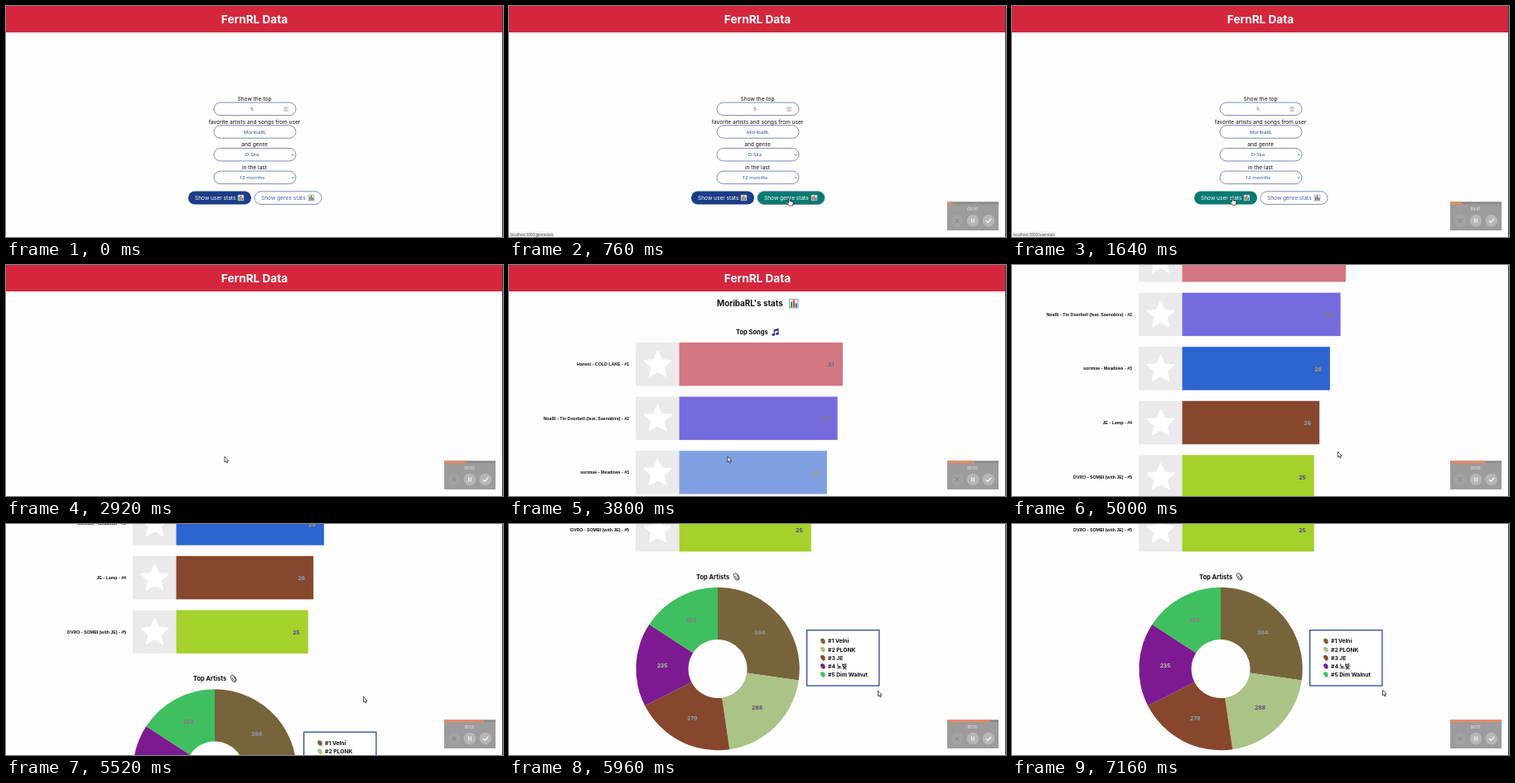
An HTML page for the animation above (7.2 s loop, 600x280 px).

```html
<!DOCTYPE html>
<html lang="en">
<head>
<meta charset="utf-8">
<title>Listening stats</title>
<style>
  html, body { margin: 0; width: 100%; height: 100%; overflow: hidden; background: #fefdfe; }
  svg { display: block; width: 600px; height: 280px; }
  text { font-family: Inter, "Noto Sans CJK KR", "Noto Sans CJK", sans-serif; }
  .bold { font-weight: 700; }
  .field { font-family: "Open Sans", "Noto Sans", sans-serif; }
  .label { font-family: "Liberation Sans", Arial, sans-serif; font-weight: 700; }
</style>
</head>
<body>
<svg id="stage" viewBox="0 0 600 280" xmlns="http://www.w3.org/2000/svg"></svg>
<script>
const LOOP = 7200;
const FRAME = 40;
const BLUE = '#203f8e';
const USER = 'MoribaRL';

const songs = [
  { name: 'Hanesi - COLD LAKE', plays: 31, fill: '#d37782', ink: '#42777e' },
  { name: 'NoaRi - Tin Doorbell (feat. Saenobira)', plays: 30, fill: '#766bdd', ink: '#85815c' },
  { name: 'sorimae - Meadows', plays: 28, fill: '#2c65d0', ink: '#c3a052' },
  { name: 'JE - Lamp', plays: 26, fill: '#86472c', ink: '#7eb0bf' },
  { name: 'DVRO - SOMBI (with JE)', plays: 25, fill: '#a4d12c', ink: '#4a36a0' }
];
const artists = [
  { name: 'Velni', plays: 384, fill: '#78643a', ink: '#9d96bb' },
  { name: 'PLONK', plays: 288, fill: '#abc386', ink: '#58467f' },
  { name: 'JE', plays: 279, fill: '#86472c', ink: '#7fabc0' },
  { name: '노빛', plays: 235, fill: '#7d1a91', ink: '#a6dca0' },
  { name: 'Dim Walnut', plays: 223, fill: '#3fbf60', ink: '#a9608b' }
];
const bar = { x: 205.5, top: 94, pitch: 65.6, height: 52.5, unit: 6.37 };
const donut = { x: 252, y: 551, outer: 98.7, inner: 35.5 };

// y is the visual middle of the line
const text = (x, y, size, str, { fill = '#111', cls = '', anchor = 'middle', id = '' } = {}) =>
  `<text x="${x}" y="${y + size * 0.36}" font-size="${size}" fill="${fill}" class="${cls}"
    text-anchor="${anchor}" ${id && `id="${id}"`}>${str}</text>`;

const rect = (x, y, w, h, fill, extra = '') =>
  `<rect x="${x}" y="${y}" width="${w}" height="${h}" fill="${fill}" ${extra}/>`;

const polar = (r, a) => [r * Math.sin(a), -r * Math.cos(a)];

const chartIcon = (x, y, s) => `<g transform="translate(${x} ${y}) scale(${s / 10})">
  ${rect(0, 0, 10, 10, '#e9eef0', 'stroke="#7d93a0" stroke-width=".8"')}
  ${rect(1.4, 3, 2, 6.4, '#3a9b4b')}${rect(4.1, 1, 2, 8.4, '#d8483c')}${rect(6.8, 4.6, 2, 4.8, '#2c6fb8')}</g>`;

const noteIcon = (x, y) => `<g transform="translate(${x} ${y})" fill="#4b3598">
  <path d="M2.6 1.4 8.6 0v6.4H7.3V2.9L3.9 3.7v4.2H2.6z"/>
  <ellipse cx="2.2" cy="7.8" rx="2" ry="1.5"/><ellipse cx="6.9" cy="6.5" rx="2" ry="1.5"/></g>`;

const clipIcon = (x, y) => `<path transform="translate(${x} ${y}) rotate(-28)" fill="none" stroke="#555"
  stroke-width=".9" d="M-1.2-2V2a1.2 1.2 0 0 0 2.4 0V-2.6a2 2 0 0 0-4 0V2.4a2.6 2.6 0 0 0 5 0V-2"/>`;

const header = rect(0, 0, 600, 32, '#d4273d') +
  text(300, 16, 13.6, 'FernRL Data', { fill: '#fff', cls: 'bold' });

function formPage() {
  const rows = [
    ['Show the top', '5', 297], ['favorite artists and songs from user', USER, 300.5],
    ['and genre', 'D-Ska', 297], ['in the last', '12 months', 297]
  ];
  const fields = rows.map(([label, value, x], i) => {
    const y = 117 + i * 27.7;
    const arrow = i > 1 ? `<path d="M344.8 ${y + 7.2}l1.5 1.5 1.5-1.5" fill="none" stroke="${BLUE}" stroke-width=".8"/>` : '';
    return text(300, y - 4.3, 6.6, label) +
      rect(251, y, 99, 15.5, '#fff', 'rx="7.75" stroke="#5d70a4" stroke-width=".8"') +
      text(x, y + 7.9, 6.1, value, { fill: BLUE, cls: 'field' }) + arrow;
  }).join('');
  const spinner = rect(334.5, 121.5, 7, 7, '#e6e6ea', 'rx="1.5"') +
    '<path d="M336.5 124.2l1.5-1.4 1.5 1.4M336.5 126l1.5 1.4 1.5-1.4" fill="none" stroke="#777" stroke-width=".6"/>';
  return fields + spinner +
    rect(220, 224.4, 76, 16.2, '#1b3d87', 'rx="8.1" id="userButton"') +
    text(228, 232.5, 6.55, 'Show user stats', { fill: '#fff', anchor: 'start' }) + chartIcon(280, 229, 7) +
    rect(300, 224.8, 81, 15.6, '#fff', 'rx="7.8" stroke="#5d70a4" stroke-width=".8" id="genreButton"') +
    text(308, 232.5, 6.55, 'Show genre stats', { fill: '#465f9b', anchor: 'start', id: 'genreText' }) + chartIcon(365, 229, 7);
}

function starPath(cx, cy, r) {
  const points = Array.from({ length: 10 }, (_, i) => {
    const [x, y] = polar(i % 2 ? r * 0.46 : r, i * Math.PI / 5);
    return `${cx + x},${cy + y}`;
  });
  return `<polygon points="${points.join(' ')}" fill="#fff" stroke="#fff" stroke-width="2" stroke-linejoin="round"/>`;
}

function songRow(song, i) {
  const y = bar.top + i * bar.pitch;
  const mid = y + bar.height / 2;
  const width = song.plays * bar.unit;
  return text(145, mid, 5.25, `${song.name} - #${i + 1}`, { cls: 'label', anchor: 'end' }) +
    rect(153, y, 52.5, bar.height, '#ebe9eb') + starPath(179.5, mid + 1, 16.5) +
    rect(bar.x, y, width, bar.height, song.fill, `id="bar${i}"`) +
    text(bar.x + width - 14.3, mid + 0.8, 6.7, song.plays, { fill: song.ink, cls: 'bold' });
}

function donutChart() {
  const total = artists.reduce((sum, a) => sum + a.plays, 0);
  let angle = 0;
  const slices = artists.map(a => {
    const end = angle + a.plays / total * 2 * Math.PI;
    const { outer, inner } = donut;
    const d = `M${polar(outer, angle)}A${outer} ${outer} 0 0 1 ${polar(outer, end)}` +
      `L${polar(inner, end)}A${inner} ${inner} 0 0 0 ${polar(inner, angle)}Z`;
    const [x, y] = polar((outer + inner) / 2, (angle + end) / 2);
    angle = end;
    return `<path d="${d}" fill="${a.fill}"/>` + text(x, y, 6.7, a.plays, { fill: a.ink, cls: 'bold' });
  });
  return `<g transform="translate(${donut.x} ${donut.y})">${slices.join('')}</g>`;
}

function legend() {
  const items = artists.map((a, i) => {
    const y = 517.5 + i * 10.1;
    return `<path transform="translate(379 ${y})" d="M-2.8-2.6C0-4.2 3.2-2 2.7 1.2 2.5 3 1.4 3.8.2 3.3-2 2.2-3.4 0-2.8-2.6z" fill="${a.fill}"/>` +
      text(385, y, 6.75, `#${i + 1} ${a.name}`, { cls: 'bold', anchor: 'start' });
  });
  return rect(359.6, 504.2, 87.3, 67.3, '#fff', 'stroke="#28499b" stroke-width="1.3"') + items.join('');
}

const statsPage = () =>
  text(251, 46.8, 9.8, `${USER}'s stats`, { cls: 'bold', anchor: 'start' }) + chartIcon(338.5, 41.5, 10.5) +
  text(274, 81.2, 7.5, 'Top Songs', { cls: 'bold', anchor: 'start' }) + noteIcon(317, 76.8) +
  songs.map(songRow).join('') +
  text(226, 439.3, 7.5, 'Top Artists', { cls: 'bold', anchor: 'start' }) + clipIcon(275, 439.3) +
  donutChart() + legend();

const recorder = () => rect(529, 237.5, 62, 34.5, '#9d9b9c') + rect(529, 237.5, 62, 2.6, '#8b898a') +
  rect(529, 237.5, 0, 2.6, '#f2855f', 'id="progress"') +
  text(559.5, 246.8, 4.4, '', { fill: '#fff', id: 'clock' }) +
  `<circle cx="541" cy="260" r="7.3" fill="#a4a2a3"/><circle cx="560" cy="260" r="7.3" fill="#b7b5b6"/>
  <circle cx="578.8" cy="260" r="7.3" fill="#b7b5b6"/>
  <g fill="none" stroke-width="1.1"><path d="M538.5 257.5l5 5m0-5l-5 5" stroke="#8d8b8c"/>
  <path d="M558.7 257.4v5.2m2.6-5.2v5.2M575.8 260.2l2.2 2.2 4.2-4.4" stroke="#fff"/></g>`;

const pointer = `<path id="arrow" d="M-1.6-3.8V3L0 1.6 1.1 4 2.2 3.5 1.2 1.3H3.2z" fill="#fff" stroke="#111" stroke-width=".7"/>
  <path id="hand" d="M-1.6-4.2c.8-.5 1.4 0 1.4.8v2.1l3 .6c.9.2 1.2.8 1 1.7L3.2 4.2H-1L-3.4.8c-.4-.8.5-1.4 1.1-.7l.7.7z"
    fill="#fff" stroke="#111" stroke-width=".7"/>`;

document.getElementById('stage').innerHTML = `
  ${rect(0, 0, 600, 280, '#fefdfe')}
  <g id="page">${header}<g id="form">${formPage()}</g><g id="stats">${statsPage()}</g></g>
  <g id="status">${rect(0, 273.4, 53, 6.6, '#f1f0f2')}
    ${text(1.5, 277, 4.4, '', { fill: '#444', cls: 'field', anchor: 'start', id: 'link' })}</g>
  <g id="recorder">${recorder()}</g>
  <g id="pointer">${pointer}</g>
  ${rect(599, 0, 1, 280, '#3a3a3c')}`;

const el = {};
document.querySelectorAll('[id]').forEach(node => { el[node.id] = node; });

const show = (node, on) => node.setAttribute('display', on ? 'inline' : 'none');
const clamp01 = v => Math.min(1, Math.max(0, v));
const smooth = v => v * v * (3 - 2 * v);

const times = { recorder: 200, enter: 480, leaveForm: 1960, results: 3280 };
const mousePath = [
  [480, 603, 262], [720, 345, 238], [960, 267, 237], [1960, 267, 237], [2200, 265.5, 236],
  [4200, 265.5, 236], [4520, 278, 237], [5000, 395, 230], [5520, 433, 213], [6080, 449, 205]
];
const wheelTimes = [4080, 4460, 5020, 5180, 5560, 5720];

function mouseAt(t) {
  const next = mousePath.findIndex(key => key[0] > t);
  if (next < 1) return mousePath[next < 0 ? mousePath.length - 1 : 0].slice(1);
  const [t0, x0, y0] = mousePath[next - 1];
  const [t1, x1, y1] = mousePath[next];
  const k = smooth((t - t0) / (t1 - t0));
  return [x0 + (x1 - x0) * k, y0 + (y1 - y0) * k];
}

// Each wheel notch glides 63px; the page ends at 375.5
const scrollAt = t =>
  Math.min(375.5, wheelTimes.reduce((sum, start) => sum + 63 * smooth(clamp01((t - start) / 200)), 0));

function render(t) {
  const [mx, my] = mouseAt(t);
  const scroll = scrollAt(t);
  const onForm = t < times.leaveForm;
  const onStats = t >= times.results;
  const overRow = onForm && t >= times.enter && my > 224 && my < 241;
  const overUser = overRow && mx > 220 && mx < 296;
  const overGenre = overRow && mx > 300 && mx < 381;

  el.page.setAttribute('transform', `translate(0 ${-scroll})`);
  show(el.form, onForm);
  show(el.stats, onStats);
  el.userButton.setAttribute('fill', overUser ? '#087a72' : '#1b3d87');
  el.genreButton.setAttribute('fill', overGenre ? '#087a72' : '#fff');
  el.genreText.setAttribute('fill', overGenre ? '#fff' : '#465f9b');

  show(el.status, overUser || overGenre);
  el.link.textContent = `localhost:3000/${overGenre ? 'genre' : 'user'}stats`;

  songs.forEach((song, i) => {
    const y = my + scroll - bar.top - i * bar.pitch;
    const over = onStats && y > 0 && y < bar.height && mx > bar.x && mx < bar.x + song.plays * bar.unit;
    el['bar' + i].setAttribute('opacity', over ? 0.6 : 1);
  });

  show(el.recorder, t >= times.recorder);
  el.progress.setAttribute('width', 62 * clamp01(t / 7160));
  el.clock.textContent = '00:0' + Math.floor(t / 1000);

  show(el.pointer, t >= times.enter);
  el.pointer.setAttribute('transform', `translate(${mx} ${my})`);
  show(el.hand, overUser || overGenre);
  show(el.arrow, !overUser && !overGenre);
}

const start = performance.now();
function tick() {
  const t = (performance.now() - start) % LOOP;
  render(Math.floor(t / FRAME) * FRAME);
  requestAnimationFrame(tick);
}
tick();
</script>
</body>
</html>
```
